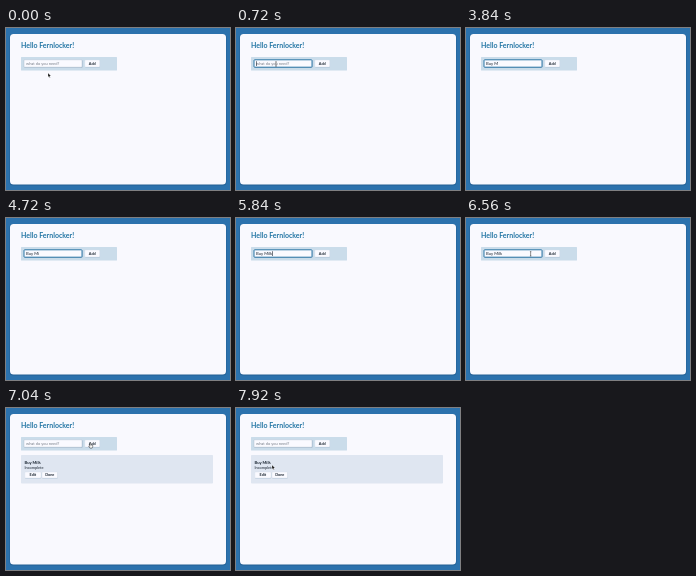
An HTML page that plays this animation: 224x162 px, repeating every 8 s.

```html
<!DOCTYPE html>
<html lang="en">
<head>
<meta charset="utf-8">
<title>Task list</title>
<style>
html, body { margin: 0; width: 100%; height: 100%; overflow: hidden; background: #2c72ad; }
svg { display: block; width: 100vw; height: 100vh; }
text { font: 700 4.1px Lato, sans-serif; fill: #17222e; }
.heading { font-size: 7px; fill: #2577a5; }
.typed { font-size: 4.2px; font-weight: 400; }
.placeholder { font-size: 4px; font-weight: 400; fill: #777d87; }
.label { font-size: 3.8px; text-anchor: middle; }
.note { font-size: 3.9px; font-weight: 400; }
.button { fill: #fafaff; stroke: #d3dbe7; stroke-width: .35; }
.shadow { fill: #8ba5bd; opacity: .55; }
</style>
</head>
<body>
<svg viewBox="0 0 224 162">
  <rect width="224" height="162" fill="#2c72ad"/>
  <rect x="3.5" y="6" width="217" height="151.5" rx="3.5" fill="#225f94"/>
  <rect x="4" y="6" width="216" height="150.5" rx="3.5" fill="#f9f9fe"/>
  <text class="heading" x="15" y="19.8">Hello Fernlocker!</text>

  <rect x="15" y="29" width="96" height="13.5" rx=".6" fill="#cadcea"/>
  <rect class="shadow" x="18.3" y="32.3" width="58.2" height="7.7" rx=".7"/>
  <rect id="field" x="18" y="31.8" width="58" height="7.4" rx=".7" fill="#fafaff"/>
  <text id="placeholder" class="placeholder" x="20" y="37">what do you need?</text>
  <text id="typed" class="typed" x="20" y="37"></text>
  <rect id="caret" y="33.2" width=".6" height="4.8" fill="#17222e"/>
  <g id="addButton"></g>

  <g id="item">
    <rect x="15" y="47" width="192" height="28.5" rx=".8" fill="#dfe6f1"/>
    <text x="18.5" y="56.2">Buy Milk</text>
    <text class="note" x="18.5" y="61">Incomplete</text>
    <g id="itemButtons"></g>
  </g>

  <g id="pointer" stroke-linejoin="round">
    <path id="arrow" d="M0 0V4.2L1 3.3L1.7 4.8L2.3 4.5L1.7 3.1H3Z" fill="#111" stroke="#fff" stroke-width=".3"/>
    <path id="beam" d="M-.7-2.2H.7M0-2.2V2.2M-.7 2.2H.7" fill="none" stroke="#222" stroke-width=".5"/>
    <path id="hand" d="M-.5 0Q0-.6 .5 0V1.6L2.2 2V3.6L1.6 4.8H-.6L-1.8 2.8L-1.2 2.4L-.5 3Z" fill="#fff" stroke="#111" stroke-width=".45"/>
  </g>
</svg>
<script>
const LOOP = 8000;
const $ = id => document.getElementById(id);
const show = (id, on) => $(id).setAttribute('visibility', on ? 'visible' : 'hidden');

const button = (x, y, w, h, label) => `
  <rect class="shadow" x="${x + .2}" y="${y + .4}" width="${w}" height="${h}" rx=".7"/>
  <rect class="button" x="${x}" y="${y}" width="${w}" height="${h}" rx=".7"/>
  <text class="label" x="${x + w / 2}" y="${y + h / 2 + 1.4}">${label}</text>`;
$('addButton').innerHTML = button(78.8, 32, 15, 7, 'Add');
$('itemButtons').innerHTML = button(18.8, 64, 16.2, 6, 'Edit') + button(36, 64, 15.6, 6, 'Done');

// [time, value]: the value holds until the next time
const typing = [[0, ''], [1440, 'B'], [2480, 'Bu'], [2960, 'Buy'], [3400, 'Buy '], [3840, 'Buy M'],
  [4160, 'Buy Mi'], [4960, 'Buy Mil'], [5040, 'Buy Milk'], [7040, '']];
const caretOn = [[720, 1360], [1520, 1760], [2320, 2480], [2720, 2800], [3920, 4000],
  [4160, 4640], [5840, 6240]];
// [time, x, y]
const moves = [[0, 42, 45], [80, 42, 45], [160, 41, 38], [320, 40, 36], [1360, 40, 36],
  [6240, 42, 36], [6480, 58, 36], [6800, 84.5, 35.3], [7200, 84.5, 35.3],
  [7360, 96, 29], [7520, 92, 43], [7720, 60, 55], [7920, 36, 57], [8000, 36, 57]];

const valueAt = (steps, t) => steps.filter(s => s[0] <= t).pop()[1];

function positionAt(t) {
  const i = Math.max(1, moves.findIndex(m => m[0] > t));
  const [t0, x0, y0] = moves[i - 1], [t1, x1, y1] = moves[i];
  const p = (t - t0) / (t1 - t0);
  return [x0 + (x1 - x0) * p, y0 + (y1 - y0) * p];
}

function render(t) {
  const text = valueAt(typing, t);
  const focused = t >= 640 && t < 6960;
  $('field').setAttribute('stroke', focused ? '#17699d' : '#9fb1c3');
  $('field').setAttribute('stroke-width', focused ? .9 : .35);

  $('typed').textContent = text.trimEnd();
  const space = text.endsWith(' ') ? .8 : 0;
  const width = text ? $('typed').getComputedTextLength() + space : 0;
  $('caret').setAttribute('x', 20.1 + width);
  show('placeholder', !text);
  show('caret', caretOn.some(([from, to]) => t >= from && t < to));
  show('item', t >= 7040);
  $('itemButtons').setAttribute('visibility', 'inherit');

  const [x, y] = positionAt(Math.floor(t / 80) * 80);
  const visible = t < 1360 || t >= 6240;
  const inside = (l, r) => x >= l && x <= r && y >= 31.5 && y <= 39.5;
  const kind = inside(18, 76) ? 'beam' : inside(78.8, 93.8) ? 'hand' : 'arrow';
  $('pointer').setAttribute('transform', `translate(${x} ${y})`);
  for (const id of ['arrow', 'beam', 'hand']) show(id, visible && id === kind);
}

const start = performance.now();
function tick() {
  render((performance.now() - start) % LOOP);
  requestAnimationFrame(tick);
}
tick();
</script>
</body>
</html>
```
